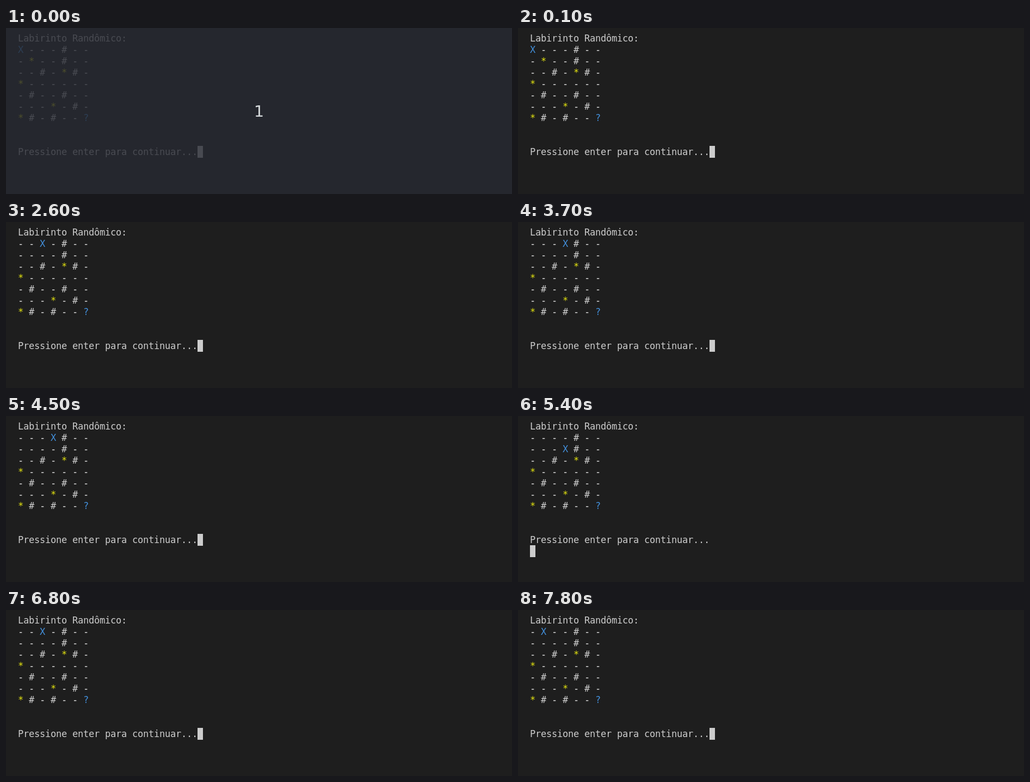
An HTML page for the animation above (8000 ms loop, 930 by 307 pixels).

```html
<!DOCTYPE html>
<html lang="pt">
<head>
<meta charset="utf-8">
<title>Labirinto</title>
<style>
  html, body { margin: 0; width: 100%; height: 100%; overflow: hidden; background: #1e1e1e; }
  svg { display: block; width: 930px; height: 307px; }
  .term { font: 17px "DejaVu Sans Mono", monospace; fill: #cccccc; }
  .count { font: 29px "DejaVu Sans", sans-serif; fill: #d6dadc; text-anchor: middle; }
</style>
</head>
<body>
<svg viewBox="0 0 930 307">
  <rect width="930" height="307" fill="#1e1e1e"/>
  <g id="term" class="term"></g>
  <rect id="cursor" width="10" height="22" fill="#cccccc"/>
  <g id="intro">
    <rect width="930" height="307" fill="#272a33" opacity="0.8"/>
    <text class="count" x="465" y="164">1</text>
  </g>
</svg>
<script>
const LOOP = 8000, TICK = 100;
const LEFT = 22, CELL = 10, LINE = 21, BASE = 25, CURSOR_TOP = 218;
const PROMPT_ROW = 10, PROMPT = 'Pressione enter para continuar...';
const COLORS = { '-': '#e5e5e5', '*': '#e5e510', 'X': '#4390dc', '?': '#4390dc', '#': '#cccccc' };

const maze = [
  '----#--',
  '-*--#--',
  '--#-*#-',
  '*------',
  '-#--#--',
  '---*-#-',
  '*#-#--?'
];

// Compass steps, '.' stays put, '!' redraws without the cursor dropping first
const route = 'S N S N SE N E S NE . . W E S! W E W . N . E! W SW W! NE'.split(' ');
// Pace of the key presses: [step, ms]
const pace = [[0, 700], [1, 1100], [4, 2000], [16, 5500], [21, 6800], [22, 7300], [24, 7800]];

function stepTime(k) {
  const i = Math.max(1, pace.findIndex(p => p[0] >= k));
  const [k0, t0] = pace[i - 1], [k1, t1] = pace[i];
  const t = t0 + (t1 - t0) * (k - k0) / (k1 - k0);
  return Math.floor(t / TICK) * TICK;
}

const axis = (step, plus, minus) => step.includes(plus) - step.includes(minus);
const path = [{ time: 0, x: 0, y: 0, drop: 0 }];
route.forEach((step, k) => {
  const last = path[k], time = stepTime(k);
  path.push({
    time,
    x: last.x + axis(step, 'E', 'W'),
    y: last.y + axis(step, 'S', 'N'),
    drop: step.endsWith('!') ? time : time - TICK
  });
});

const byId = id => document.getElementById(id);
const term = byId('term'), cursor = byId('cursor'), intro = byId('intro');

function addText(str, col, row) {
  const el = document.createElementNS('http://www.w3.org/2000/svg', 'text');
  el.setAttribute('x', [...str].map((_, i) => LEFT + (col + i) * CELL).join(' '));
  el.setAttribute('y', BASE + row * LINE);
  el.textContent = str;
  return term.appendChild(el);
}

addText('Labirinto Randômico:', 0, 0);
addText(PROMPT, 0, PROMPT_ROW);
const cells = maze.map((line, r) => [...line].map((ch, c) => addText(ch, c * 2, r + 1)));

function paint(c, r, ch) {
  const el = cells[r][c];
  if (el.textContent !== ch) el.textContent = ch;
  el.setAttribute('fill', COLORS[ch]);
}

function render(t) {
  const done = path.filter(p => p.time <= t);
  const now = done[done.length - 1], next = path[done.length];
  const visited = (c, r) => done.some(p => p.x === c && p.y === r);

  maze.forEach((line, r) => [...line].forEach((ch, c) => {
    const here = c === now.x && r === now.y;
    paint(c, r, here ? 'X' : ch === '*' && visited(c, r) ? '-' : ch);
  }));

  const entered = next && t >= next.drop;
  cursor.setAttribute('x', LEFT + (entered ? 0 : PROMPT.length * CELL));
  cursor.setAttribute('y', CURSOR_TOP + (entered ? LINE : 0));
  intro.setAttribute('visibility', t < TICK ? 'visible' : 'hidden');
}

const start = performance.now();
function tick() {
  render((performance.now() - start) % LOOP);
  requestAnimationFrame(tick);
}
render(0);
requestAnimationFrame(tick);
</script>
</body>
</html>
```
